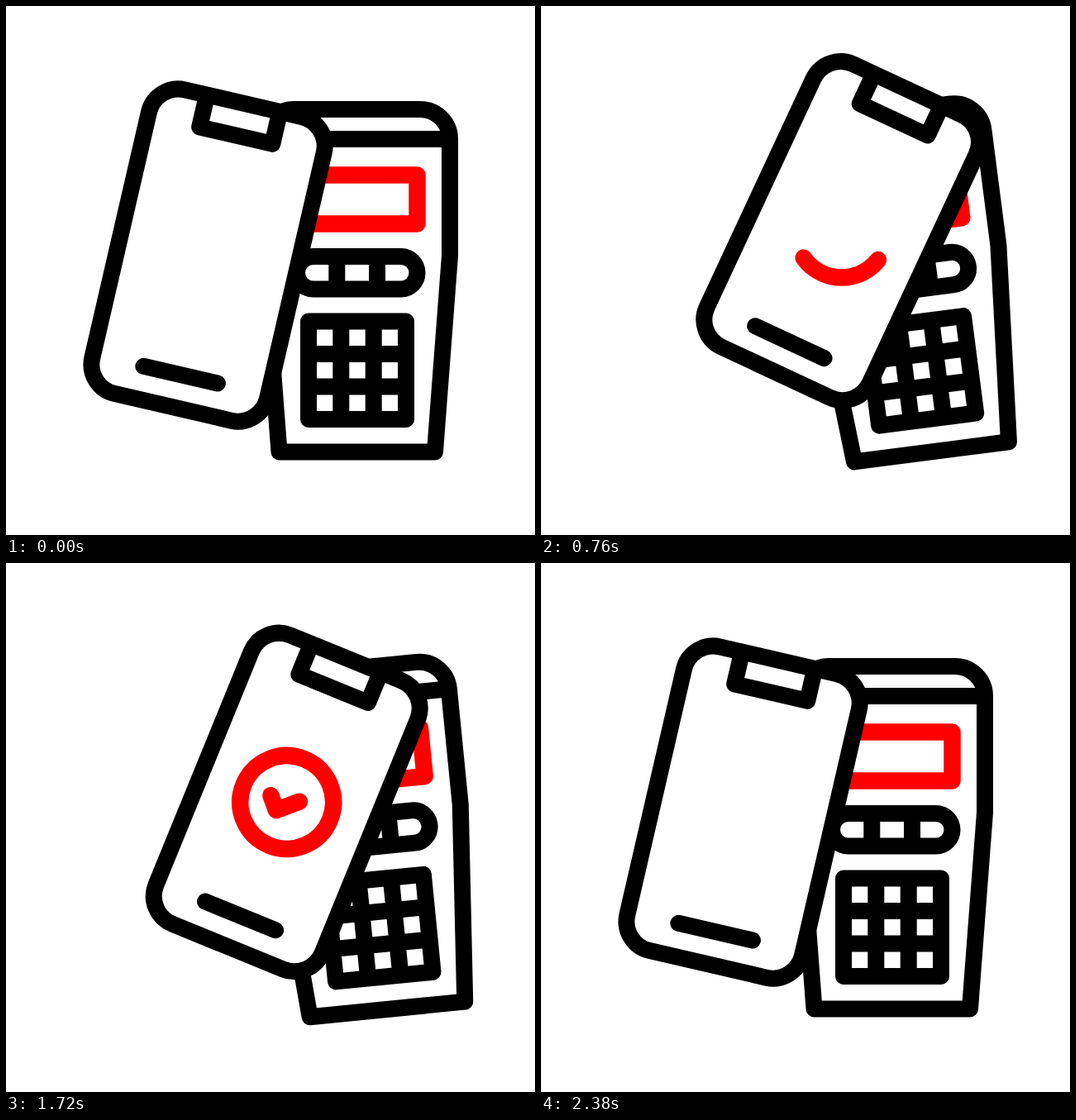
These frames come from a looping animation (640 by 640 pixels, 2.4 s). An HTML page:

```html
<!DOCTYPE html>
<html lang="en">
<head>
<meta charset="utf-8">
<title>Contactless payment</title>
<style>
  html, body { margin: 0; height: 100%; overflow: hidden; background: #fff; }
  svg { display: block; width: 100%; height: 100%; }
  g { fill: none; stroke: #000; stroke-width: 20; stroke-linecap: round; stroke-linejoin: round; }
  .red { stroke: #f00; stroke-width: 20.5; }
</style>
</head>
<body>
<svg viewBox="0 0 640 640">
  <g id="terminal">
    <path d="M330.5 539.5H519L537 302V161A36 36 0 0 0 501 125H348.5A36 36 0 0 0 312.5 161V302ZM312.5 161H537"/>
    <rect class="red" x="352" y="204.5" width="145.5" height="59"/>
    <rect x="352" y="303" width="145.5" height="39.5" rx="19.75"/>
    <path d="M400.3 303V342M449 303V342"/>
    <path d="M366 381.5H484V500H366ZM405.3 382V500M444.7 382V500M366 421H484M366 460.5H484"/>
  </g>
  <g id="phone">
    <rect x="-108.7" y="-188.7" width="217.4" height="377.4" rx="36.4" fill="#fff"/>
    <path d="M-45 -188.5V-148.7H45.5V-188.5M-46 148.5H46"/>
    <circle id="ring" class="red" r="56.4" pathLength="360"/>
    <path id="check" class="red" d="M-21 -.3L-8.3 13.7L21.5 -13.5" pathLength="1"/>
  </g>
</svg>
<script>
const LOOP = 2400, PEAK = 1168, RING_SEED = 19;
const [terminal, phone, ring, check] =
  ['terminal', 'phone', 'ring', 'check'].map(id => document.getElementById(id));

// Cubic ease in and out from 0 to 1 between two times
function ease(t, from, to) {
  const x = Math.min(1, Math.max(0, (t - from) / (to - from)));
  return x < 0.5 ? 4 * x ** 3 : 1 - 4 * (1 - x) ** 3;
}

function showDash(shape, start, length) {
  shape.style.display = length > 0.001 ? '' : 'none';
  shape.setAttribute('stroke-dasharray', `${length} 1000`);
  shape.setAttribute('stroke-dashoffset', -start);
}

function draw(t) {
  const p = t < PEAK ? ease(t, 0, PEAK) : 1 - ease(t, PEAK, LOOP);
  terminal.setAttribute('transform', `rotate(${-8.85 * p} 447.3 168)`);

  // The phone's centre swings along a circle while the phone tilts
  const swing = (-14.9 + 69.3 * p) * Math.PI / 180;
  const x = 277.3 + 127.4 * Math.sin(swing);
  const y = 178.4 + 127.4 * Math.cos(swing);
  phone.setAttribute('transform', `translate(${x} ${y}) rotate(${13 + 14.45 * p})`);

  const drawn = ease(t, 526, 1086);
  const start = RING_SEED * (1 - drawn) + 360 * ease(t, 1800, 2360);
  const end = RING_SEED + (360 - RING_SEED) * drawn;
  showDash(ring, start, end - start);
  showDash(check, 0, ease(t, 1000, 1560) - ease(t, 1580, 1980));
}

function tick() {
  draw(performance.now() % LOOP);
  requestAnimationFrame(tick);
}
tick();
</script>
</body>
</html>
```
